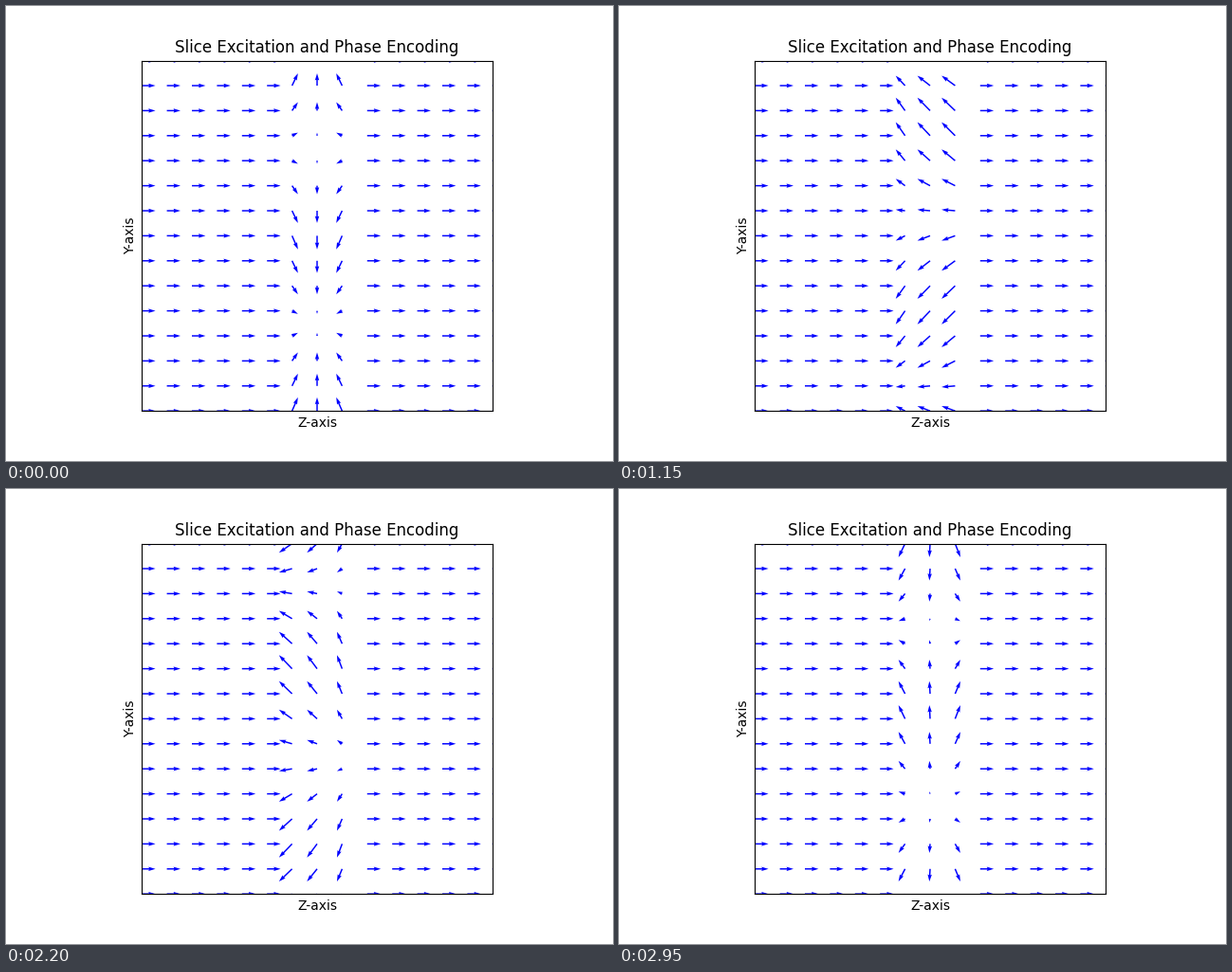
A matplotlib script that plays this animation: 640x480 px, repeating every 3000 ms.

```python
import numpy as np
import matplotlib.pyplot as plt
from matplotlib.animation import FuncAnimation

FRAMES = 60
INTERVAL = 50  # ms
GRID = 15
SLICE_HALF_WIDTH = 0.2

plt.rcParams["font.family"] = "DejaVu Sans"

axis = np.linspace(-1, 1, GRID)
z, y = np.meshgrid(axis, axis)
in_slice = np.abs(z) < SLICE_HALF_WIDTH


def field(i):
    """Arrow components: static outside the slice, phase-encoded inside."""
    phase = np.pi * i / FRAMES
    u = np.where(in_slice, -np.sin(np.pi * z + phase), 1.0)
    v = np.where(in_slice, -np.cos(np.pi * y + phase), 0.0)
    return u, v


fig, ax = plt.subplots(figsize=(6.4, 4.8), dpi=100)
ax.set_aspect("equal")
ax.set(xlim=(-1, 1), ylim=(-1, 1), xticks=[], yticks=[])
ax.set_title("Slice Excitation and Phase Encoding", fontsize=12)
ax.set_xlabel("Z-axis", fontsize=10)
ax.set_ylabel("Y-axis", fontsize=10)

u0, v0 = field(0)
# Fix the scale to the first field so arrow lengths stay comparable.
scale = 1.8 * GRID * np.hypot(u0, v0).mean()
arrows = ax.quiver(z, y, u0, v0, color="blue", scale=scale)


def update(i):
    arrows.set_UVC(*field(i))
    return (arrows,)


anim = FuncAnimation(fig, update, frames=FRAMES, interval=INTERVAL,
                     repeat=True, repeat_delay=0, blit=False)
plt.show()
```
